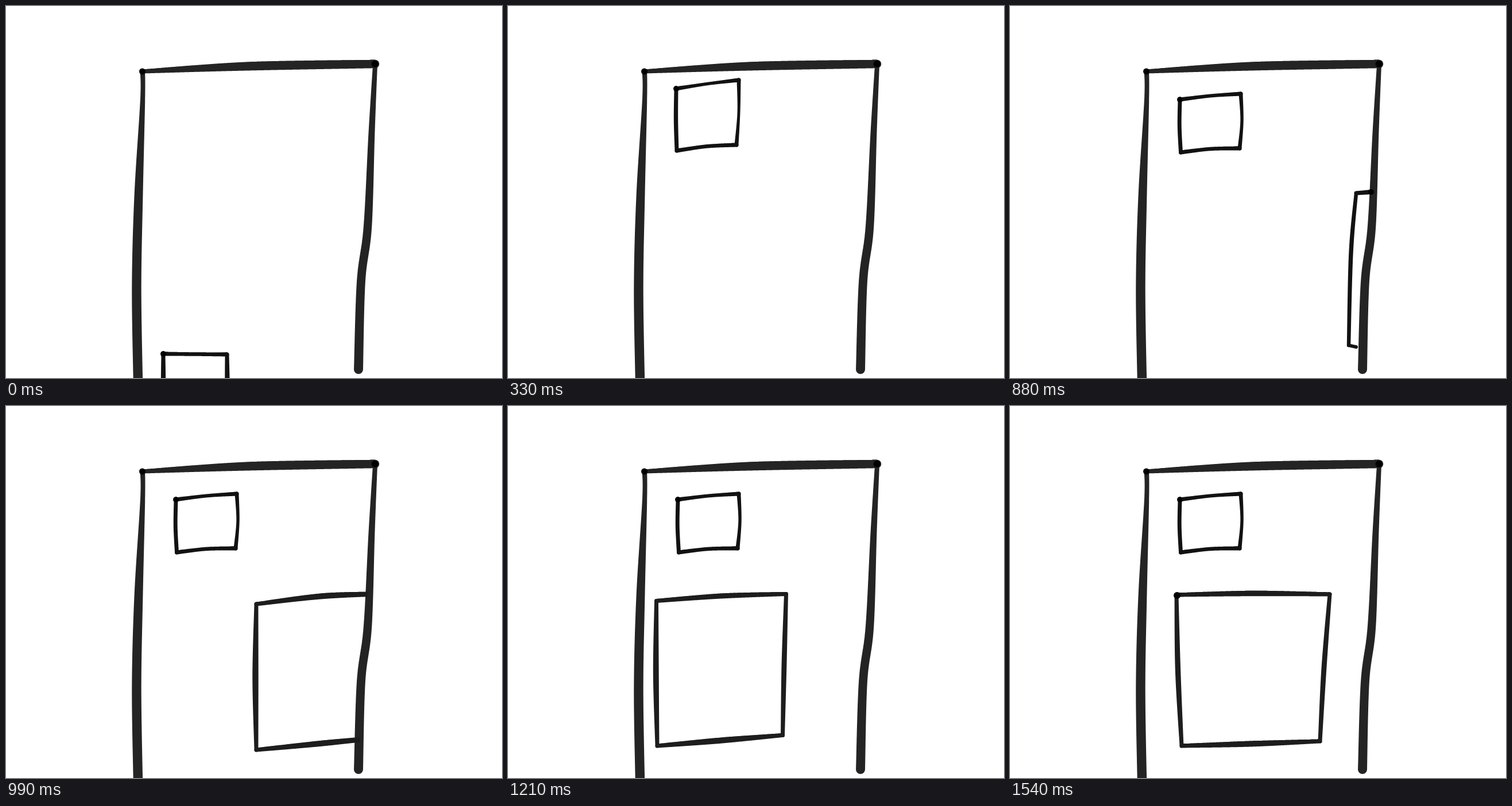
An HTML page with a canvas for the animation above (1980 ms loop, 864x648 px).

```html
<!DOCTYPE html>
<html lang="en">
<head>
<meta charset="utf-8">
<title>Sliding panels</title>
<style>
  html, body { margin: 0; overflow: hidden; background: #fff; }
  canvas { display: block; }
</style>
</head>
<body>
<canvas id="stage" width="864" height="648"></canvas>
<script>
const ctx = document.getElementById('stage').getContext('2d');
const LOOP = 1980, STEP = 110, CORNER = 7;
const FRAME_INK = '#242424', SMALL_INK = '#121212', BIG_INK = '#1d1d1d';

// Strokes pass through a few key points: [x, y, brush width].
const leftPost = [[238, 115, 8.5], [238, 165, 8.5], [231, 330, 15], [227.5, 490, 16.5], [230, 655, 16.5]];
const topBar = [[238, 114, 7], [420, 105, 15], [643, 101, 14.5]];
const rightPost = [[643, 103, 8], [637, 220, 11], [630, 385, 14.5], [618.5, 480, 15], [614, 633, 16]];

// Boxes go clockwise; each side is [start x, start y, outward bow, middle width].
const smallLow = [[274, 606, 0, 6.5], [385, 607, 0, 8.5], [386, 713, 0, 7], [274, 714, 0, 8.5]];
const smallHigh = [[293, 144, 1, 5.5], [402, 129, 2, 5], [398, 242, -2.5, 6.5], [294, 252, 1, 7.5]];
const smallRest = [[296, 163, 1.5, 6], [402, 153, 3, 5.5], [400, 248, -2.5, 6.5], [297.5, 255, 1.5, 7]];
const bigWide = [[293, 345, 5, 10], [531, 327, 0, 9], [526, 576, 0, 10], [293, 599, 1.5, 10.5]];
const bigNarrow = [[328, 334, 0, 8], [542, 328, -1, 9], [535, 571, 0, 10.5], [331, 585, 1.5, 9.5]];
const bigRest = [[290, 329, 2, 9.5], [557, 328, -1.5, 9], [540, 584, 0.5, 10], [299, 592, 2, 9.5]];

const mix = (a, b, k) => a.map((side, i) => side.map((v, j) => v + (b[i][j] - v) * k));
const shift = (box, dx) => box.map(([x, ...rest]) => [x + dx, ...rest]);

// The big box slides in at step 8 and swings until it settles at step 14.
const SLIDE_IN = 8;
const bigPoses = [
  shift(bigWide, 143), bigWide,
  shift(mix(bigWide, bigNarrow, 0.5), -52), bigNarrow,
  shift(mix(bigNarrow, bigRest, 0.5), 10), bigRest
];
const penMarks = {
  8: [[629, 324, 10]],
  10: [[513, 325, 8]],
  12: [[482, 331.5, 9], [503, 329, 9]],
  14: [[291, 330, 12]]
};

const spline = (a, b, c, d, k) =>
  b + k / 2 * (c - a + k * (2 * a - 5 * b + 4 * c - d + k * (3 * (b - c) + d - a)));

function stamp(x, y, w) {
  ctx.moveTo(x + w / 2, y);
  ctx.arc(x, y, w / 2, 0, 7);
}

function brush(points, ink) {
  ctx.fillStyle = ink;
  ctx.beginPath();
  stamp(...points[0]);
  for (let i = 0; i + 1 < points.length; i++) {
    const b = points[i], c = points[i + 1];
    const a = points[i - 1] || b, d = points[i + 2] || c;
    const n = Math.ceil(Math.hypot(c[0] - b[0], c[1] - b[1]));
    for (let s = 1; s <= n; s++) {
      stamp(...b.map((v, j) => spline(a[j], v, c[j], d[j], s / n)));
    }
  }
  ctx.fill();
}

const dot = (x, y, w) => brush([[x, y, w]], '#000');

function drawBox(box, ink) {
  box.forEach(([x, y, bow, w], i) => {
    const [endX, endY] = box[(i + 1) % 4];
    const dx = endX - x, dy = endY - y, out = bow / Math.hypot(dx, dy);
    const middle = [(x + endX) / 2 + dy * out, (y + endY) / 2 - dx * out, w];
    brush([[x, y, CORNER], middle, [endX, endY, CORNER]], ink);
  });
}

function drawSmall(step) {
  const box = step < 3 ? mix(smallLow, smallHigh, step / 3)
    : mix(smallHigh, smallRest, Math.min(1, (step - 3) / 2));
  drawBox(box, SMALL_INK);
  dot(box[0][0], box[0][1], 10);
}

function drawBig(step) {
  if (step < SLIDE_IN) return;
  const pose = Math.min(step, 14);
  if (pose === SLIDE_IN) {
    brush([[629, 324, 8], [603, 326, 7]], SMALL_INK);
    brush([[603, 326, 6.5], [594, 430, 7.5], [590, 591, 6.5]], SMALL_INK);
    brush([[590, 591, 6], [603, 594, 6]], SMALL_INK);
  } else {
    // The right post hides whatever has not slid in yet.
    ctx.save();
    ctx.beginPath();
    for (const [x, y] of [[0, 300], [631, 300], [615, 610], [0, 610]]) ctx.lineTo(x, y);
    ctx.clip();
    drawBox(bigPoses[pose - SLIDE_IN - 1], BIG_INK);
    ctx.restore();
  }
  if (penMarks[pose]) brush(penMarks[pose], '#000');
}

function draw() {
  const step = Math.floor(performance.now() % LOOP / STEP);
  ctx.fillStyle = '#fff';
  ctx.fillRect(0, 0, 864, 648);
  for (const line of [leftPost, topBar, rightPost]) brush(line, FRAME_INK);
  dot(237.5, 114, 11);
  dot(642.5, 101, 12);
  drawSmall(step);
  drawBig(step);
  requestAnimationFrame(draw);
}
draw();
</script>
</body>
</html>
```
